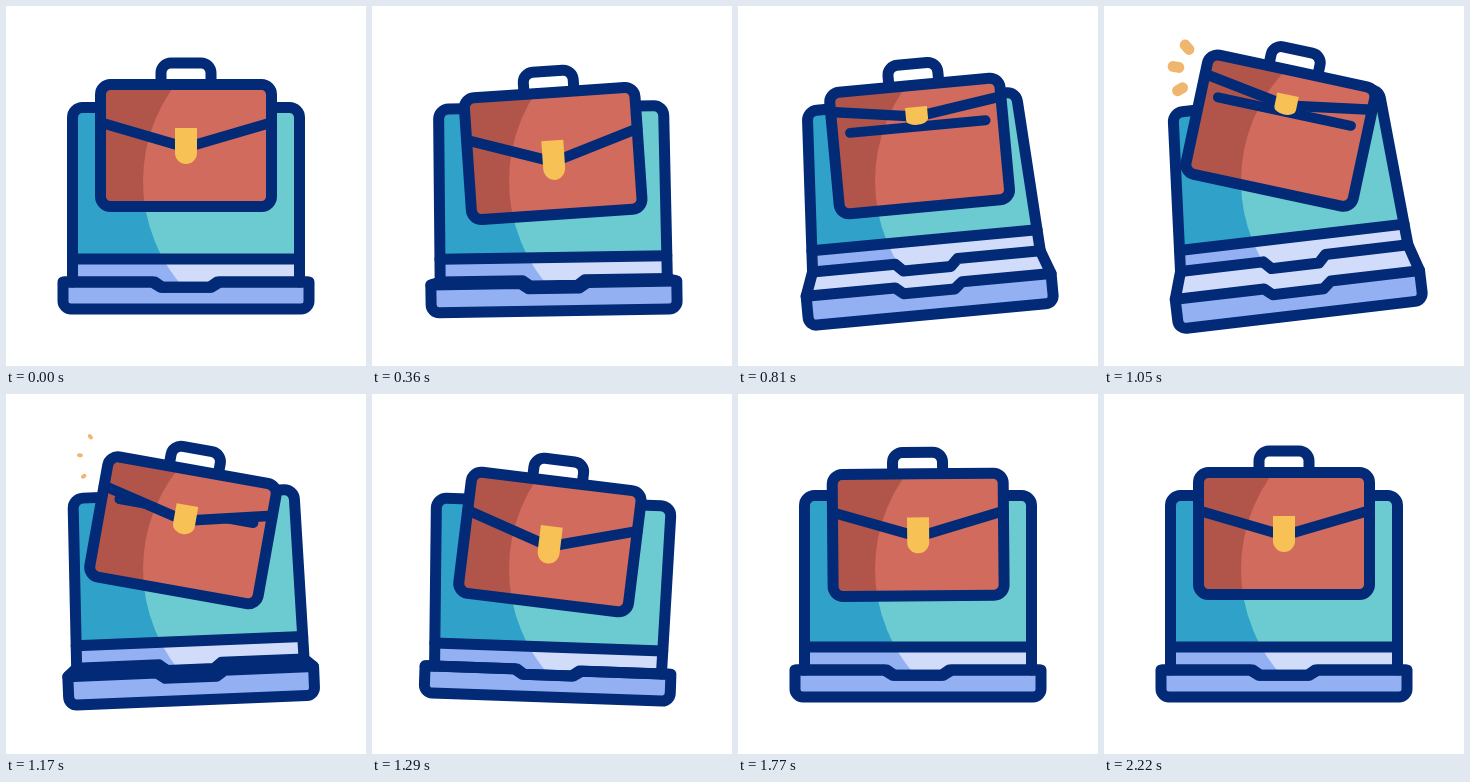
Animation, 360 px wide and 360 px high, one loop 2250 ms. Source, as an HTML page with a canvas:

```html
<!DOCTYPE html>
<html lang="en">
<head>
<meta charset="utf-8">
<title>Laptop and briefcase</title>
<style>
html, body { margin: 0; width: 100%; height: 100%; overflow: hidden; background: #fff; }
canvas { display: block; width: 100vw; height: 100vh; }
</style>
</head>
<body>
<canvas id="stage"></canvas>
<script>
const LOOP = 2250, STEP = 30, SIZE = 360;
const NAVY = '#032a77', GOLD = '#f8c155', SPARK = '#f0b56e';
const TEAL = ['#30a2ca', '#6ccbd0'], ICE = ['#93b1f2', '#d1dcfb'], RUST = ['#b1554b', '#d06b5d'];

const canvas = document.getElementById('stage');
const ctx = canvas.getContext('2d');
const ratio = Math.max(1, window.devicePixelRatio || 1);
canvas.width = canvas.height = SIZE * ratio;

// Key poses; angles in degrees, lid opens from 0 to 1, negative leans forward
const pose = (time, tilt, open, bagY, bagTilt, flap) => ({ time, tilt, open, bagY, bagTilt, flap });
const poses = [
  pose(0, 0, 0, 139.5, 0, 1),
  pose(360, -.9, .1, 147.5, -3.9, 1.1),
  pose(810, -5.3, .87, 140, -5.3, .5),
  pose(1050, -6.7, 1, 124.6, 12.1, .56),
  pose(1290, 2, -.4, 148, 7, 1.04),
  pose(1770, 0, 0, 140.8, -.5, 1),
  pose(2100, 0, 0, 139.5, 0, 1),
  pose(LOOP, 0, 0, 139.5, 0, 1)
];

// Monotone cubic through the keys: smooth, without overshoot
function poseAt(t) {
  let i = 0;
  while (i < poses.length - 2 && t >= poses[i + 1].time) i++;
  const from = poses[i], to = poses[i + 1], span = to.time - from.time, u = (t - from.time) / span;
  const slope = (j, key) => j < 0 || j > poses.length - 2 ? 0 :
    (poses[j + 1][key] - poses[j][key]) / (poses[j + 1].time - poses[j].time);
  const tangent = (j, key) => {
    const a = slope(j - 1, key), b = slope(j, key);
    return a * b > 0 ? 2 * a * b / (a + b) : 0;
  };
  const out = {};
  for (const key in from) {
    const bend = span * u * (1 - u) * ((1 - u) * tangent(i, key) - u * tangent(i + 1, key));
    out[key] = from[key] + (to[key] - from[key]) * u * u * (3 - 2 * u) + bend;
  }
  return out;
}

const mix = (a, b, u) => [a[0] + (b[0] - a[0]) * u, a[1] + (b[1] - a[1]) * u];

function line(points) {
  ctx.beginPath();
  points.forEach(p => ctx.lineTo(p[0], p[1]));
}

// Closed polygon; a third value rounds that corner
function shape(points) {
  const start = mix(points[points.length - 1], points[0], .5);
  ctx.beginPath();
  ctx.moveTo(...start);
  points.forEach((p, i) => {
    const next = points[i + 1] || start;
    if (p[2]) ctx.arcTo(p[0], p[1], next[0], next[1], p[2]);
    else ctx.lineTo(p[0], p[1]);
  });
  ctx.closePath();
}

// Adds the left half of a symmetric outline, given its right half
const mirror = half => [...half, ...half.slice().reverse().map(([x, ...rest]) => [-x, ...rest])];

function ink(width = 11) {
  ctx.strokeStyle = NAVY;
  ctx.lineWidth = width;
  ctx.stroke();
}

function fill(color) {
  ctx.fillStyle = color;
  ctx.fill();
}

function base() { ctx.setTransform(ratio, 0, 0, ratio, 0, 0); }

// Runs paint in a moved and turned frame
function placed(x, y, degrees, paint) {
  ctx.save();
  ctx.translate(x, y);
  ctx.rotate(degrees * Math.PI / 180);
  paint();
  ctx.restore();
}

// Fills the current path; the light tone lies in a circle fixed to the stage
function shade([dark, light]) {
  ctx.save();
  fill(dark);
  ctx.clip();
  base();
  ctx.beginPath();
  ctx.arc(297, 175, 160, 0, 2 * Math.PI);
  fill(light);
  ctx.restore();
}

// Horizontal edge with a dip in the middle, from right to left
const notch = (half, y, depth) =>
  mirror([[half, y], [half * .274, y], [half * .208, y + depth]]);

function drawLaptop({ open }) {
  const deck = Math.max(0, open), give = 3 * Math.sqrt(deck);
  const backY = -27 * deck, hingeY = backY - 23 + 2 * deck;
  const topY = backY - 174.5 + 16 * Math.abs(open);
  const topW = 113.5 - 10 * open, backW = 113.5 + deck, frontW = 123;
  const hingeW = backW + (topW - backW) * .132;
  const back = notch(backW, backY, 5.2 + 2.5 * deck), front = notch(frontW, 0, 5.2 + 1.6 * deck);
  const bottom = [frontW, 27 + give, 8], top = [topW, topY, 10];
  const hinge = mirror([[hingeW, hingeY]]);

  shape(mirror([top, [hingeW, hingeY]]));
  shade(TEAL);
  shape([...hinge.slice().reverse(), ...back]);
  shade(ICE);
  shape([...back.slice().reverse(), ...front]);
  fill(ICE[1]);
  shape([...front, [-bottom[0], bottom[1], 8], bottom]);
  fill(ICE[0]);

  shape(mirror([top, [backW, backY], [frontW, 0, 2], bottom]));
  ink();
  for (const edge of [hinge, back, front]) { line(edge); ink(); }
}

function drawBag({ flap }) {
  const w = 85.5, h = 61;
  ctx.beginPath();
  ctx.moveTo(-25, -h);
  ctx.arcTo(-25, -82.5, 0, -82.5, 10);
  ctx.arcTo(25, -82.5, 25, -h, 10);
  ctx.lineTo(25, -h);
  ink();

  const body = mirror([[w, -h, 10], [w, h, 10]]);
  shape(body);
  shade(RUST);
  line(mirror([[68, -19.5]]));
  ink(10);

  const drop = v => v * flap - h;
  const edge = [[-w, drop(38)], [0, drop(63)], [w, drop(38)]];
  ctx.save();
  shape(body);
  ctx.clip();
  shape([[w, -h], [-w, -h], ...edge]);
  shade(RUST);
  ctx.restore();
  line(edge);
  ink(10.5);
  shape(body);
  ink();

  ctx.beginPath();
  ctx.moveTo(-11, drop(43.5));
  ctx.lineTo(11, drop(43.5));
  ctx.ellipse(0, drop(68.5), 11, 11 * flap, 0, 0, Math.PI);
  ctx.closePath();
  fill(GOLD);
}

// Three short rays that swell and fade beside the bag
function drawSparks(t) {
  const u = (t - 930) / 270;
  if (u <= 0 || u >= 1) return;
  const size = Math.sin(u * Math.PI);
  ctx.strokeStyle = SPARK;
  ctx.lineWidth = 11 * size;
  for (let i = 0; i < 3; i++) {
    placed(105, 66.5, 150 + 39.5 * i, () => {
      line([[30.5, 0], [30.5 + 6 * size, 0]]);
      ctx.stroke();
    });
  }
}

function draw(t) {
  const p = poseAt(t);
  base();
  ctx.fillStyle = '#fff';
  ctx.fillRect(0, 0, SIZE, SIZE);
  ctx.lineJoin = ctx.lineCap = 'round';
  const sink = 3 * Math.sqrt(Math.max(0, p.open));
  placed(180 - 2 * p.tilt, 276 + sink, p.tilt, () => drawLaptop(p));
  placed(180 - .3 * p.bagTilt, p.bagY, p.bagTilt, () => drawBag(p));
  drawSparks(t);
}

const start = performance.now();
function tick() {
  draw(Math.floor((performance.now() - start) / STEP) * STEP % LOOP);
  requestAnimationFrame(tick);
}
tick();
</script>
</body>
</html>
```
